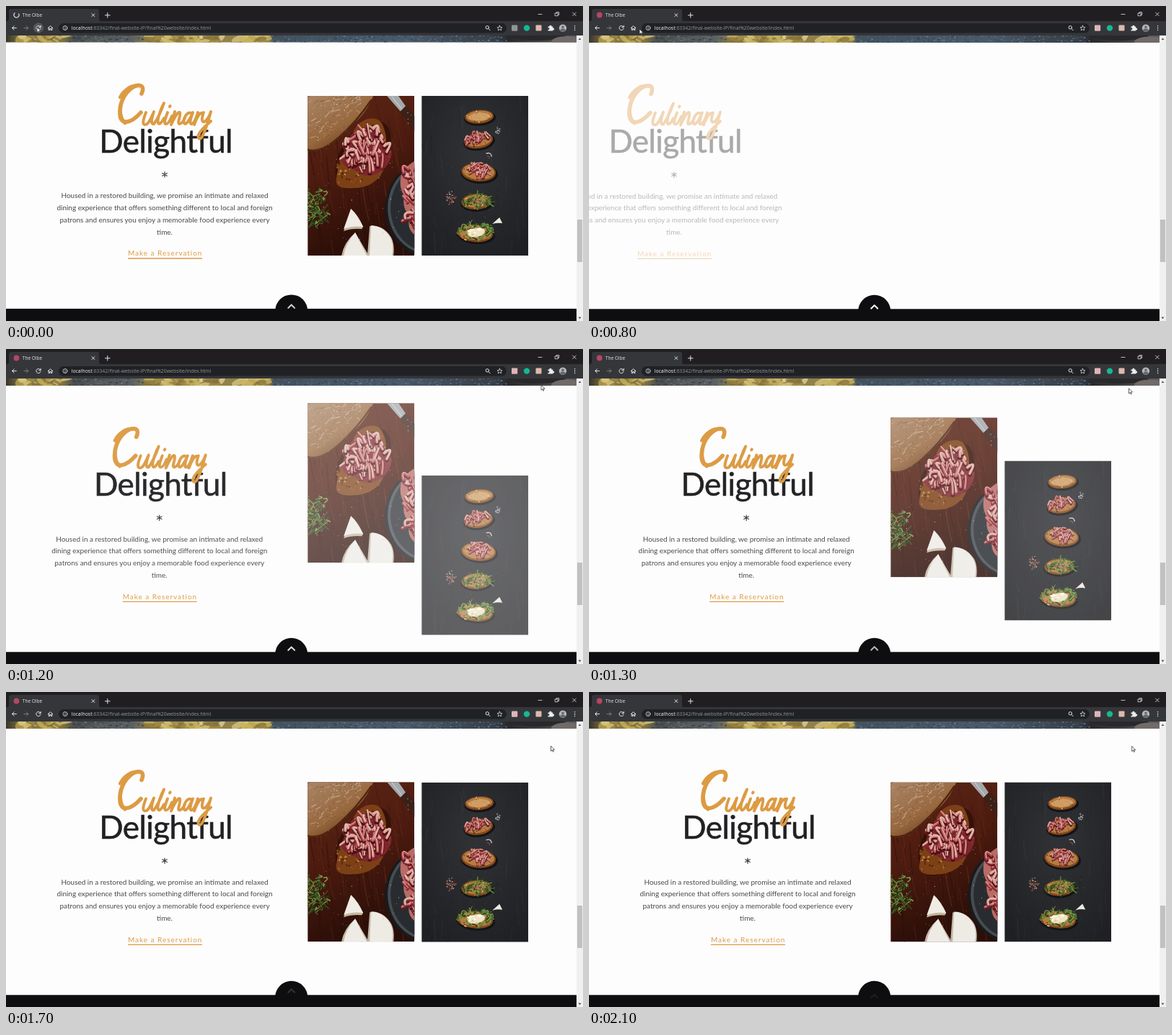
An HTML page for the animation above (2.2 s loop, 800 px wide and 438 px high).

```html
<!DOCTYPE html>
<html lang="en">
<head>
<meta charset="utf-8">
<title>Restaurant page reload</title>
<style>
html, body { margin: 0; width: 100%; height: 100%; overflow: hidden; background: #fefdfe; }
svg { display: block; width: 800px; height: 438px; }
.ui { font-family: "Open Sans", "Noto Sans", sans-serif; }
.copy { font-family: Lato, "Open Sans", sans-serif; }
.line { fill: none; stroke-linecap: round; stroke-linejoin: round; }
</style>
</head>
<body>
<svg viewBox="0 0 800 438" xmlns="http://www.w3.org/2000/svg">
  <defs>
    <clipPath id="photoClip"><rect width="148" height="222"/></clipPath>
    <clipPath id="bannerClip"><rect y="40" width="791" height="10.5"/></clipPath>
    <linearGradient id="wood" x2=".3" y2="1">
      <stop stop-color="#5c2616"/><stop offset=".5" stop-color="#4d1b0f"/><stop offset="1" stop-color="#2a0e08"/>
    </linearGradient>
    <linearGradient id="loaf" x2=".7" y2="1">
      <stop stop-color="#a98566"/><stop offset=".6" stop-color="#98683f"/><stop offset="1" stop-color="#5f3216"/>
    </linearGradient>
    <radialGradient id="slate" cx=".5" cy=".35" r=".75">
      <stop stop-color="#313236"/><stop offset="1" stop-color="#1f2023"/>
    </radialGradient>
    <linearGradient id="stone">
      <stop stop-color="#37352c"/><stop offset=".03" stop-color="#8a7a42"/><stop offset=".1" stop-color="#7d7144"/>
      <stop offset=".12" stop-color="#484d4e"/><stop offset=".22" stop-color="#596064"/><stop offset=".25" stop-color="#8b7d45"/>
      <stop offset=".46" stop-color="#94844a"/><stop offset=".47" stop-color="#42525f"/><stop offset=".7" stop-color="#4a5a6a"/>
      <stop offset=".86" stop-color="#363d45"/><stop offset=".88" stop-color="#28292d"/><stop offset="1" stop-color="#5d5a58"/>
    </linearGradient>
  </defs>

  <rect width="800" height="438" fill="#fefdfe"/>
  <g id="page">
    <g id="banner" clip-path="url(#bannerClip)"></g>
    <g id="intro">
      <text class="copy" x="221.6" y="204" font-size="44" letter-spacing="-.6" text-anchor="middle" fill="#212123" stroke="#212123" stroke-width=".55">Delightful</text>
      <g id="script" class="line" stroke="#dc9b43"></g>
      <path class="line" stroke="#3c3c3e" stroke-width="1.2" d="M220 230.6v7.4M216.7 232.4l6.6 3.8M223.3 232.4l-6.6 3.8"/>
      <g id="lines" class="copy" font-size="9.96" text-anchor="middle" fill="#48484a"></g>
      <text class="copy" x="169" y="347.3" font-size="10" letter-spacing=".97" fill="#dc9b43">Make a Reservation</text>
      <path d="M169 351h103" stroke="#dc9b43" stroke-width="1.3"/>
    </g>
    <g id="left"><g id="leftPhoto" clip-path="url(#photoClip)"></g></g>
    <g id="right"><g id="rightPhoto" clip-path="url(#photoClip)"></g></g>
    <rect y="420.9" width="791" height="20" fill="#0e0e10"/>
    <circle cx="395.7" cy="423.9" r="22.5" fill="#0e0e10"/>
    <path id="chevron" class="line" d="M-4.4 2.3L0-2.1 4.4 2.3" stroke="#fff" stroke-width="2.1"/>
  </g>

  <rect x="791" y="41" width="9" height="397" fill="#f1f0f1"/>
  <rect x="792" y="297" width="7" height="59" fill="#c0c0c1"/>
  <path d="M793.5 47l2-2.6 2 2.6zM793.5 432.6l2 2.6 2-2.6z" fill="#555"/>

  <g id="chrome" class="ui">
    <rect width="800" height="22" fill="#201e21"/>
    <path d="M1 21q3 0 3-3V7q0-3 3-3h119q3 0 3 3v11q0 3 3 3z" fill="#35363a"/>
    <rect y="21" width="800" height="20" fill="#35363a"/>
    <rect x="73" y="24" width="621" height="13.4" rx="6.7" fill="#202124"/>
    <circle id="favicon" cx="14.5" cy="12.5" r="3.9" fill="#b44762"/>
    <path id="spinner" class="line" d="M12.2 9.8a3.5 3.5 0 1 0 5.4 1" stroke="#d5deee" stroke-width="1.2"/>
    <text x="22.8" y="14.8" font-size="6.5" fill="#e4e5e8">The Olbe</text>
    <text x="90.7" y="33" font-size="6.9" fill="#93969b"><tspan fill="#f4f4f5">localhost</tspan>:63342/final-website-IP/final%20website/index.html</text>
    <circle id="hover" cx="45" cy="30.5" r="7.2" fill="#55565a"/>
    <g class="line" stroke="#e3e4e7" stroke-width="1">
      <path d="M119 10.7l3.8 3.8m0-3.8L119 14.5M137.5 12.8h6.6m-3.3-3.3v6.6"/>
      <path d="M738 11.5h5M761.5 10h3.7v3.7h-3.7zM763 10V8.6h3.7v3.7h-1.4M785.6 9l4.7 4.7m0-4.7l-4.7 4.7" stroke-width=".8"/>
      <path d="M14.4 30.5H8.6m2.6-2.7l-2.7 2.7 2.7 2.7"/>
      <path d="M25 30.5h5.8m-2.6-2.7l2.7 2.7-2.7 2.7" stroke="#7c7d81"/>
      <path d="M47.6 28.8a3.1 3.1 0 1 0 .4 2.6M48.2 27.3v2.4h-2.5"/>
      <path d="M58.2 30.7l3.3-3 3.3 3M59.2 30v3.5h1.5v-2h1.6v2h1.5V30"/>
      <path d="M82 30.3v2M82 28.8v.1" stroke-width=".8"/><circle cx="82" cy="30.6" r="3" stroke-width=".8"/>
      <circle cx="667.3" cy="29.8" r="2.2"/><path d="M669 31.6l2.2 2.2"/>
      <path d="M684.5 27.2l1 2.3 2.5.2-1.9 1.7.6 2.5-2.2-1.3-2.2 1.3.6-2.5-1.9-1.7 2.5-.2z" stroke-width=".75"/>
    </g>
    <rect id="extension" x="701" y="26.6" width="8.2" height="8.2" rx="1"/>
    <circle cx="722" cy="30.6" r="4.2" fill="#16b991"/>
    <rect x="734.5" y="26.6" width="8" height="8" rx="1" fill="#dcb9ae"/>
    <path d="M751.5 28.6h2.1a1.4 1.4 0 1 1 2.6 0h2v2.1a1.4 1.4 0 1 1 0 2.6v1.3h-6.7v-1.8a1.3 1.3 0 1 0 0-2.3z" fill="#eceded"/>
    <circle cx="772" cy="30.6" r="5.2" fill="#b4b6ba"/>
    <path d="M767.9 33.5q4-4.5 8.2 0a5.2 5.2 0 0 1-8.2 0z" fill="#65676c"/><circle cx="772" cy="29.2" r="1.8" fill="#65676c"/>
    <path class="line" d="M788.6 27.7v.1M788.6 30.6v.1M788.6 33.5v.1" stroke="#e8e8ea" stroke-width="1.5"/>
  </g>
  <path id="cursor" d="M0 0v7.2l1.7-1.6 1.1 2.6 1.1-.5-1.1-2.5h2.3z" fill="#fff" stroke="#222" stroke-width=".7"/>
</svg>

<script>
const LOOP = 2200, RELOAD = 100;
const $ = id => document.getElementById(id);
const set = (id, attrs) => { for (const k in attrs) $(id).setAttribute(k, attrs[k]); };
const clamp = v => Math.max(0, Math.min(1, v));
const times = (n, f) => Array.from({ length: n }, (_, i) => f(i)).join("");

function randomizer(seed) {
  return (a = 0, b = 1) => {
    seed = (seed * 16807) % 2147483647;
    return +(a + (b - a) * seed / 2147483647).toFixed(2);
  };
}
const rnd = randomizer(4217);
const pick = list => list[Math.floor(rnd(0, list.length - .01))];

const ellipse = (x, y, rx, ry, fill, turn = 0, extra = "") =>
  `<ellipse cx="${x}" cy="${y}" rx="${rx}" ry="${ry}" fill="${fill}" transform="rotate(${turn} ${x} ${y})" ${extra}/>`;
const shape = (d, fill, extra = "") => `<path d="${d}" fill="${fill}" ${extra}/>`;
const stroke = (d, color, width, extra = "") =>
  `<path class="line" d="${d}" stroke="${color}" stroke-width="${width}" ${extra}/>`;

// Scatter calls draw with points spread evenly inside a tilted ellipse.
function scatter(n, cx, cy, rx, ry, turn, draw) {
  const c = Math.cos(turn), s = Math.sin(turn);
  return times(n, () => {
    const a = rnd(0, 6.283), r = Math.sqrt(rnd());
    const x = Math.cos(a) * r * rx, y = Math.sin(a) * r * ry;
    return draw(+(cx + x * c - y * s).toFixed(1), +(cy + x * s + y * c).toFixed(1));
  });
}
const specks = (n, cx, cy, rx, ry, colors, size, turn = 0) =>
  scatter(n, cx, cy, rx, ry, turn, (x, y) => ellipse(x, y, rnd(size * .4, size), rnd(size * .4, size), pick(colors)));

// Each ribbon is a dark fold with a paler strip of meat and a thin rim of fat.
function ham(n, cx, cy, rx, ry, turn, size) {
  return scatter(n, cx, cy, rx, ry, turn, (x, y) => {
    const d = `q${rnd(-size, size)} ${rnd(-size, 0)} ${rnd(-size * .7, size * .7)} ${rnd(size * .2, size)}`;
    const w = rnd(size * .14, size * .32), lift = -w * .45;
    return stroke(`M${x} ${y}${d}`, pick(["#641a20", "#85252d", "#4a1014"]), w * 1.2)
      + stroke(`M${x} ${y + lift}${d}`, pick(["#c0605f", "#d08b84", "#b04a4e", "#d9a299"]), w * .8)
      + stroke(`M${x} ${y + lift * 1.6}${d}`, "#ecd0c4", w * .2);
  });
}

const LEAVES = ["#3d6128", "#5d8534", "#243d18", "#7d9c49"];
const herbs = (n, cx, cy, rx, ry, size) => scatter(n, cx, cy, rx, ry, 0, (x, y) =>
  stroke(`M${x} ${y}q${rnd(-size, size)} ${rnd(-size, size)} ${rnd(-size, size)} ${rnd(-size, size)}`, pick(LEAVES), rnd(.7, 1.8)));

function banner() {
  const pasta = (x0, x1, n) => times(n, () =>
    ellipse(rnd(x0, x1), rnd(38, 53), rnd(5, 13), rnd(2, 4.5), pick(["#c9b35f", "#dcca83", "#a58d45", "#e3d59b", "#86733a"]), rnd(-50, 50), `opacity=".75"`));
  return `<rect y="40" width="791" height="11" fill="url(#stone)"/>`
    + times(240, () => ellipse(rnd(368, 695), rnd(41, 51), rnd(.5, 2), rnd(.3, 1), pick(["#65788a", "#33404c", "#55687c", "#3a4855"])))
    + times(80, () => ellipse(rnd(88, 190), rnd(41, 51), rnd(.5, 3), rnd(.3, 1.2), pick(["#70777a", "#3a4043", "#5d625f"])))
    + pasta(16, 84, 26) + pasta(196, 358, 55)
    + ellipse(735, 39, 42, 9, "#29282b") + ellipse(778, 50, 22, 8, "#706b68");
}

function platter() {
  return `<rect width="148" height="222" fill="url(#wood)"/>`
    + times(75, () => {
      const x = rnd(-10, 150), y = rnd(0, 200);
      return stroke(`M${x} ${y}q2 20 ${rnd(4, 10)} ${rnd(30, 60)}`, pick(["#713521", "#280e09", "#61281a", "#3a160e"]), rnd(.4, 1.3), `opacity=".6"`);
    })
    + shape("M0 0H91Q84 18 71 32Q48 54 24 72Q10 80 0 75Z", "url(#loaf)")
    + times(60, () => {
      const x = rnd(0, 72), y = rnd(0, 66 - x * .75);
      return stroke(`M${x} ${y}l${rnd(2, 9)} ${rnd(-6, -1)}`, pick(["#c6ab91", "#7d5230", "#d8c7b2", "#8f6440"]), rnd(.5, 1.5), `opacity=".6"`);
    })
    + specks(110, 36, 29, 45, 25, ["#c4a585", "#7a4d29", "#d9c8b2"], .8, -.65)
    + stroke("M1 75Q18 80 43 58T88 6", "#4f260f", 2.5)
    + shape("M110 0H126L137 16 130 23Z", "#a4a9ac") + stroke("M117 1l14 18", "#d5d8d8", 1)
    + shape("M128 22L136 14Q146 21 150 32V51Z", "#3b2118") + specks(4, 140, 30, 5, 9, ["#b19f87"], 1)
    + ellipse(77, 82, 53, 31, "#1f0905", -58, `opacity=".55"`)
    + shape("M80 33Q100 27 105 43Q112 59 106 79Q111 104 95 117Q80 131 51 128Q37 126 40 114Q42 96 47 86Q53 70 61 56Q66 39 80 33Z", "#7c4016")
    + specks(130, 74, 82, 47, 27, ["#b9783a", "#cf9654", "#522509", "#8c4e1f"], 2, -1.05)
    + shape("M60 54Q78 38 92 47Q106 51 107 68Q120 72 115 87Q110 102 94 109Q78 115 68 103Q52 102 47 90Q54 69 60 54Z", "#7d262c")
    + ham(58, 80, 73, 29, 25, -.9, 17)
    + ellipse(168, 157, 61, 67, "#181a1d") + ellipse(169, 156, 58, 64, "#474c51") + ellipse(170, 156, 55, 61, "#282c30")
    + shape("M132 104Q145 91 149 91V194Q136 184 142 167Q130 156 134 139Q124 124 132 104Z", "#b96b66")
    + ham(24, 143, 136, 8, 42, 0, 15)
    + stroke("M3 180Q18 155 15 132M5 165Q20 163 28 151M8 151Q0 142 2 134M-2 153Q12 157 29 176", "#35512a", 1.4)
    + herbs(58, 11, 152, 15, 30, 10)
    + shape("M60 157Q70 166 77 182L75 185Q61 184 50 188Z", "#c4b7a1") + shape("M60 157Q69 165 77 182Q62 180 50 185Z", "#f0ece5")
    + shape("M47 222Q50 204 66 190L83 219 86 181Q105 179 116 197Q121 207 119 222Z", "#c3b7a4")
    + shape("M50 222Q53 204 66 190L82 222ZM86 219L88 180Q105 181 114 196Q120 206 117 222H86Z", "#eeebe5")
    + specks(65, 75, 120, 62, 88, ["#d7b7a0", "#a67b68", "#e9d9c7"], .6);
}

function board() {
  const slice = (x, y, rx, ry, turn) => ellipse(x + 1, y + 2, rx + 2, ry + 1, "#131417", turn)
    + ellipse(x, y, rx, ry, "#84481b", turn) + ellipse(x, y - .8, rx - 2, ry - 2, "#b67c42", turn)
    + specks(36, x, y, rx - 2, ry - 1, ["#e0b778", "#743b14", "#a3642c"], 1.3);
  return `<rect width="148" height="222" fill="url(#slate)"/>`
    + times(55, () => stroke(`M${rnd(0, 148)} ${rnd(0, 220)}l${rnd(-5, 5)} ${rnd(10, 35)}`, pick(["#45464a", "#1e1f23"]), rnd(.5, 2), `opacity=".22"`))
    + slice(80, 29, 20, 9.5, -4) + ellipse(80, 29, 15, 5.5, "#d9ad73", -4, `opacity=".7"`)
    + slice(79, 62, 20, 11, -9) + ham(24, 79, 57, 16, 7, -.15, 9)
    + slice(79, 106, 24, 13, 4) + ham(30, 80, 102, 17, 8, .1, 9)
    + slice(76, 147, 21, 11, -3) + herbs(75, 77, 146, 20, 10, 6) + ham(5, 76, 147, 11, 4, 0, 5)
    + slice(74, 191, 25, 12, 5) + herbs(85, 74, 187, 24, 12, 6)
    + ellipse(76, 190, 12, 6, "#eee3c6", -12) + specks(13, 76, 190, 12, 6, ["#fff4dc", "#d9c99a"], 2.3)
    + specks(24, 106, 48, 5, 5, ["#d9d8d8", "#f2f2f2", "#9b9da2"], .9)
    + stroke("M90 80q6-2 7 4", "#cfc6c4", 1.4) + stroke("M91 84q4-1 3 3", "#8d5963", 1)
    + specks(38, 41, 143, 8, 10, ["#70362c", "#a45b45", "#17181a", "#bfa291"], 1.2)
    + shape("M98 178L108 169 112 177Q105 176 98 178Z", "#eee9df")
    + specks(30, 80, 112, 48, 98, ["#75767a", "#a0a0a2"], .4);
}

$("banner").innerHTML = banner();
$("leftPhoto").innerHTML = platter();
$("rightPhoto").innerHTML = board();
$("lines").innerHTML = [
  "Housed in a restored building, we promise an intimate and relaxed",
  "dining experience that offers something different to local and foreign",
  "patrons and ensures you enjoy a memorable food experience every",
  "time."
].map((s, i) => `<text x="220" y="${267.4 + i * 16.7}">${s}</text>`).join("");

const capital = "M188 122C194 108 182 108 173 115C162 124 157 138 158 151C159 165 172 165 187 148";
const letters = [
  "M194 148C191 156 188 165 193 165C198 165 202 154 205 147C202 156 200 165 205 164",
  "Q213 153 219 135C215 142 209 158 211 163C213 166 217 160 219 156",
  "M224 148C221 156 218 164 222 164C225 164 228 158 230 153M227 140l.6-1",
  "M234 147L229 165C234 154 239 146 241 148C243 151 237 163 240 164Q244 164 248 156",
  "M257 149C251 146 245 157 247 163C250 167 256 155 259 148C256 156 254 164 257 164Q261 163 264 154",
  "M266 148L261 165C265 154 269 147 273 149",
  "M274 148C271 157 271 162 275 161C279 159 283 151 284 147C281 158 276 176 271 183C267 187 265 182 268 177C272 170 280 164 284 160"
].join("");
$("script").innerHTML = `<path d="${capital}" stroke-width="5.6"/>`
  + `<path d="M158 127C163 117 174 109 183 111M160 134Q156 153 165 163" stroke-width="4.4"/><path d="${letters}" stroke-width="3.9"/>`;

// The CSS "ease" curve.
function ease(x) {
  if (x <= 0 || x >= 1) return clamp(x);
  let lo = 0, hi = 1;
  for (let i = 0; i < 24; i++) {
    const s = (lo + hi) / 2, w = 1 - s;
    if (.75 * w * w * s + .75 * w * s * s + s * s * s < x) lo = s; else hi = s;
  }
  const w = 1 - lo;
  return .3 * w * w * lo + 3 * w * lo * lo + lo ** 3;
}

const pointer = [[0, 43, 29.5], [600, 43, 29.5], [800, 70, 32], [1200, 742, 50], [1500, 766.5, 68], [1700, 755.5, 75], [2100, 752.7, 75.3], [LOOP, 752.7, 75.3]];
function pointerAt(t) {
  const i = pointer.findIndex((p, k) => k && t <= p[0]);
  const [t0, x0, y0] = pointer[i - 1], [t1, x1, y1] = pointer[i];
  const u = (t - t0) / (t1 - t0), k = u * u * (3 - 2 * u);
  return `translate(${x0 + (x1 - x0) * k} ${y0 + (y1 - y0) * k})`;
}

function render(t) {
  const before = t < RELOAD;
  const text = before ? 1 : ease((t - 612) / 800);
  const photo = before ? 1 : ease((t - 800) / 950);
  const drift = 175 * (1 - photo);
  set("page", { transform: `translate(0 ${before ? 0 : .4})` });
  set("intro", { transform: `translate(${-164 * (1 - text)} 0)`, opacity: text });
  set("left", { transform: `translate(418.2 ${125 - drift})`, opacity: photo });
  set("right", { transform: `translate(576.2 ${125 + drift})`, opacity: photo });

  const u = before ? .4 : ((t - 50) % 2000) / 2000;
  const glow = before ? .8 : Math.min(clamp(u / .35), clamp((.88 - u) / .36));
  set("chevron", { transform: `translate(395.7 ${414.7 + 8 * (1 - u) ** 2})`, opacity: glow });

  set("hover", { opacity: t < 700 ? 1 : 0 });
  set("favicon", { opacity: before ? 0 : 1 });
  set("spinner", { opacity: before ? 1 : 0 });
  set("extension", { fill: before ? "#929397" : "#dfb4b8" });
  set("cursor", { transform: pointerAt(t) });
}

const start = performance.now();
function tick() {
  render((performance.now() - start) % LOOP);
  requestAnimationFrame(tick);
}
render(0);
requestAnimationFrame(tick);
</script>
</body>
</html>
```
